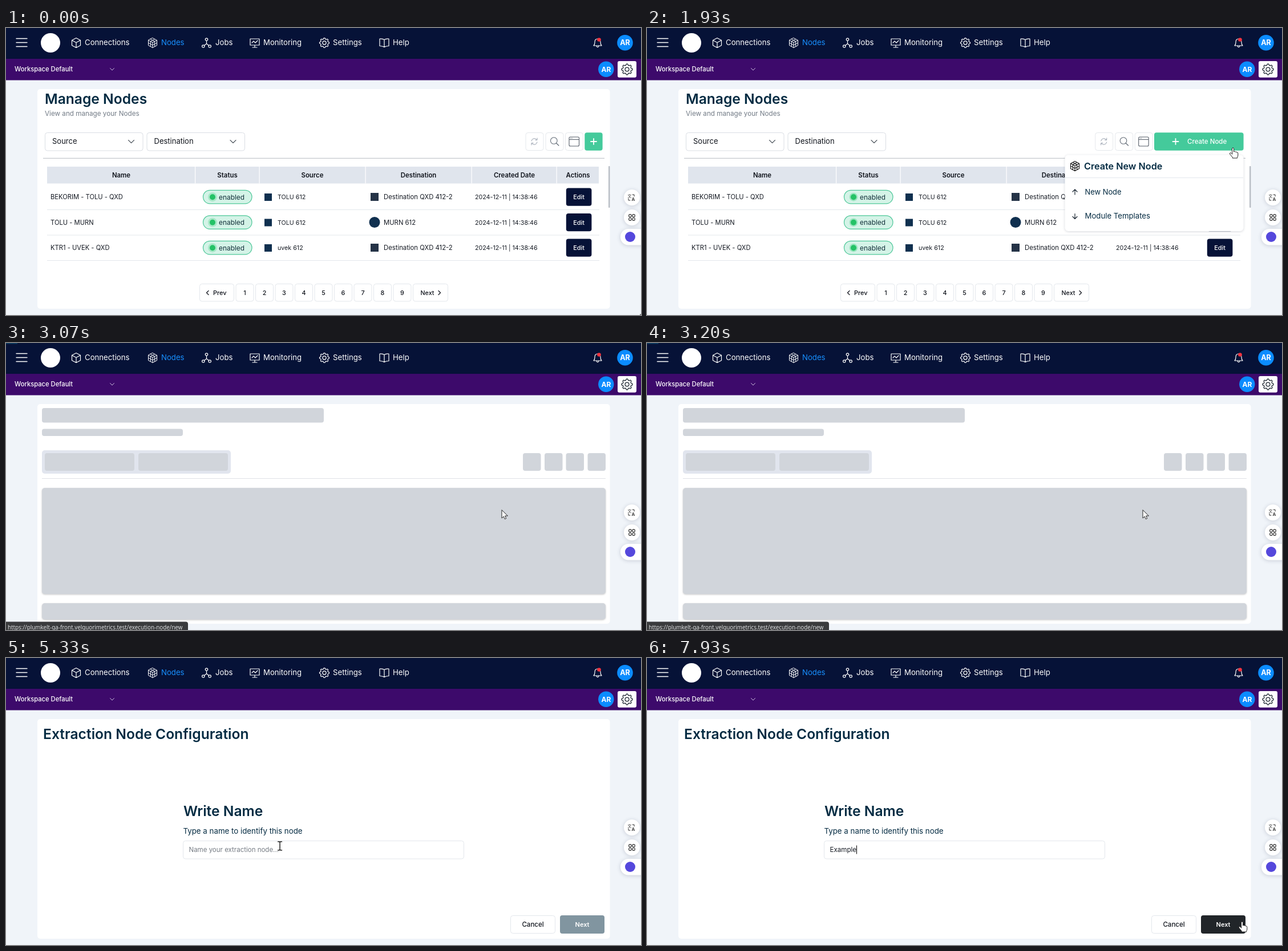
These frames come from a looping animation (1113 by 503 pixels, 8 s). An HTML page with a canvas:

```html
<!DOCTYPE html>
<html lang="en">
<head>
<meta charset="utf-8">
<title>Manage Nodes</title>
<style>
html, body { margin: 0; width: 100%; height: 100%; overflow: hidden; background: #f0f4f9; }
canvas { display: block; width: 1113px; height: 503px; }
</style>
</head>
<body>
<canvas id="stage" width="1113" height="503"></canvas>
<script>
const LOOP = 8000, STEP = 1000 / 15;
const ctx = document.getElementById('stage').getContext('2d');
const SANS = 'Inter, "Open Sans", sans-serif';
const NAVY = '#061237', INK = '#042b42', GRAY = '#d1d5db', LINE = '#e3e7ec';

const clamp = v => Math.max(0, Math.min(1, v));
const ease = v => v * v * (3 - 2 * v);
const span = (t, a, b) => ease(clamp((t - a) / (b - a)));

// y is the middle of the capital letters
function text(str, x, y, size, color, weight = 400, align = 'left', family = SANS) {
  ctx.font = `${weight} ${size}px ${family}`;
  ctx.fillStyle = color;
  ctx.textAlign = align;
  ctx.fillText(str, x, y + size * 0.364);
}

function box(x, y, w, h, r, fill, stroke, lw = 1) {
  ctx.beginPath();
  ctx.roundRect(x, y, w, h, r);
  paint(fill, stroke, lw);
}

function disc(x, y, r, fill, stroke, lw = 1) {
  ctx.beginPath();
  ctx.arc(x, y, r, 0, 7);
  paint(fill, stroke, lw);
}

function paint(fill, stroke, lw) {
  if (fill) { ctx.fillStyle = fill; ctx.fill(); }
  if (stroke) { ctx.strokeStyle = stroke; ctx.lineWidth = lw; ctx.stroke(); }
}

function path(d, x, y, stroke, lw = 1.2, fill) {
  const p = new Path2D(d);
  ctx.save();
  ctx.translate(x, y);
  ctx.lineCap = ctx.lineJoin = 'round';
  if (fill) { ctx.fillStyle = fill; ctx.fill(p); }
  if (stroke) { ctx.strokeStyle = stroke; ctx.lineWidth = lw; ctx.stroke(p); }
  ctx.restore();
}

function shadowed(color, blur, dy, draw) {
  ctx.save();
  ctx.shadowColor = color;
  ctx.shadowBlur = blur;
  ctx.shadowOffsetY = dy;
  draw();
  ctx.restore();
}

function gear(x, y, r, color, lw) {
  ctx.beginPath();
  for (let i = 0; i < 96; i++) {
    const a = i / 96 * Math.PI * 2;
    const k = r * (0.89 + 0.11 * Math.tanh(2.5 * Math.cos(8 * a)));
    ctx.lineTo(x + k * Math.cos(a), y + k * Math.sin(a));
  }
  ctx.closePath();
  paint(null, color, lw);
  disc(x, y, r * 0.36, null, color, lw);
}

const CUBE = 'M0-8.5L7.5-4.5V4.5L0 8.5L-7.5 4.5V-4.5ZM-7.5-4.5L0-.5L7.5-4.5M0-.5V8.5';
const GRID = CUBE + 'M-3.8-6.5L3.7-2.5V6.5M3.8-6.5L-3.7-2.5V6.5M-7.5 0L0 4L7.5 0';
const CHEVRON = 'M-5-2.5L0 2.5L5-2.5';

function header() {
  box(0, 0, 1113, 54, 0, NAVY);
  box(0, 54, 1113, 37.5, 0, '#3d0a6b');
  path('M18 18.5H37M18 25.5H37M18 32.5H37', 0, 0, '#fff', 1.3);
  disc(78, 26, 17, '#fff');

  path(CUBE, 123, 26, '#fff');
  path(GRID, 257, 26, '#fff', 1);
  path('M0-4V1.5L-4.5 5M0 1.5L4.5 5', 351.5, 26, '#fff');
  [[0, -6], [-5.7, 6], [5.7, 6]].forEach(([x, y]) => disc(351.5 + x, 26 + y, 2.2, NAVY, '#fff', 1.2));
  path('M-8-7H8V4H-8ZM0 4V8M-4 8H4M-5 0L-2-3L1 0L5-4', 436, 26, '#fff');
  gear(558, 26, 8.5, '#fff', 1.2);
  path('M0-5Q-3-7-8-6.5V6Q-3 6 0 8Q3 6 8 6V-6.5Q3-7 0-5V8', 663, 25.5, '#fff');

  [['Connections', 138], ['Nodes', 272], ['Jobs', 367], ['Monitoring', 451], ['Settings', 573], ['Help', 678]]
    .forEach(([s, x]) => text(s, x, 25.5, 13.2, s === 'Nodes' ? '#1890ff' : '#fff'));

  path('M-7 5Q-5 3-5-1Q-5-7 0-7Q5-7 5-1Q5 3 7 5ZM-2 5.5Q0 10 2 5.5', 1037, 26, '#fff');
  disc(1039.5, 20.5, 3.3, '#f5333f');
  disc(1085, 25.7, 13.8, '#0b8cff');
  text('AR', 1085, 25.5, 12.5, '#fff', 700, 'center');

  text('Workspace Default', 15, 72, 11.2, '#fff', 500);
  path('M-3.5-1.5L0 2L3.5-1.5', 186, 72, '#cdbfe0', 1);
  disc(1051.8, 72.3, 13.7, '#0b8cff');
  text('AR', 1052, 72.3, 12, '#fff', 700, 'center');
  box(1072, 58, 33, 28.7, 3, '#fff');
  gear(1088.5, 72.5, 9.5, '#1c2430', 1.3);
}

function sideTools() {
  shadowed('rgba(40,50,80,.2)', 7, 1, () => {
    disc(1097, 297, 14, '#fff');
    disc(1097, 332, 14, '#fff');
    box(1077, 352, 60, 28.5, 14, '#fff');
  });
  text('文', 1089.5, 294.5, 7, '#333', 500, 'left', '"Noto Sans CJK SC", sans-serif');
  text('A', 1096.5, 300, 8, '#333', 600);
  path('M1098 292H1101V295M1091 299V302H1094', 0, 0, '#333', 1);
  for (const x of [-3.1, 3.1]) for (const y of [-3.1, 3.1]) disc(1097 + x, 332 + y, 2.3, null, '#333', 1.1);
  disc(1094, 366, 9, '#5548dc');
}

const ROWS = [
  ['BEKORIM - TOLU - QXD', 'TOLU 612', 'Destination QXD 412-2'],
  ['TOLU - MURN', 'TOLU 612', 'MURN 612'],
  ['KTR1 - UVEK - QXD', 'uvek 612', 'Destination QXD 412-2']
];

// Status dot: ring grows to twice its size and fades out once a second
function ping(x, y, t) {
  const p = clamp(((t + 200) % 1000) / 750);
  let s = p;
  for (let i = 0; i < 12; i++) s = Math.sqrt(p / (0.6 + 0.4 * s));
  const k = ease(clamp(s));
  ctx.globalAlpha = 0.75 * (1 - k);
  disc(x, y, 5 * (1 + k), '#3fd17f');
  ctx.globalAlpha = 1;
  disc(x, y, 5, '#24c266');
}

function table(t) {
  box(72, 243, 967, 29.5, 0, '#e0e5ed');
  [331.5, 444, 630, 816, 965].forEach(x => box(x - 0.5, 243, 1.2, 29.5, 0, '#fff'));
  [['Name', 202], ['Status', 388], ['Source', 537], ['Destination', 723], ['Created Date', 891], ['Actions', 1002.5]]
    .forEach(([s, x]) => text(s, x, 258, 11.4, '#10141c', 600, 'center'));

  ROWS.forEach(([name, source, dest], i) => {
    const y = 296 + i * 44.5, mid = y + 0.2;
    text(name, 78, mid, 11.2, '#161b24');
    box(345.5, y - 11.7, 85.5, 23.5, 12, '#d4f3e7', '#4cc798', 1.2);
    ping(362, y + 0.2, t);
    text('enabled', 373, mid, 11.9, '#12303a');
    box(453, y - 6, 13, 13, 0, '#10304f');
    text(source, 476, mid, 10.7, '#161b24');
    if (i === 1) disc(646, y, 9.5, '#10304f');
    else box(639, y - 7, 14, 14, 0, '#253347');
    text(dest, 662, mid, 11.3, '#161b24');
    text('2024-12-11 | 14:38:46', 822, mid, 10.7, '#161b24');
    box(981.8, y - 15.5, 44.6, 31.3, 4, NAVY);
    text('Edit', 1004, mid, 10.9, '#fff', 500, 'center');
    box(72, y + 22, 968, 1, 0, LINE);
  });
  box(1056, 242, 2.5, 73, 1, '#b9bec6');
}

function pager() {
  box(339.5, 448.5, 60, 30.5, 4, '#fff', LINE);
  text('Prev', 363, 464, 11, '#10141c', 500);
  path('M2-3.5L-1.5 0L2 3.5', 353, 464, '#10141c');
  for (let i = 0; i < 9; i++) {
    const x = 418.5 + i * 34.5;
    box(x - 15.5, 448.5, 31, 30.5, 4, '#fff', LINE);
    text(i + 1, x, 464, 10.8, '#10141c', 500, 'center');
  }
  box(713.5, 448.5, 61, 30.5, 4, '#fff', LINE);
  text('Next', 726.5, 464, 10.7, '#10141c', 500);
  path('M-2-3.5L1.5 0L-2 3.5', 760, 464, '#10141c');
}

const grow = t => 125.3 * span(t, 1400, 1730);

function toolbar(t) {
  const w = grow(t), x = -w;
  [926.5, 961.5, 996].forEach(c => box(c - 15.5 + x, 183.5, 31, 31, 4, '#fff', '#e5e8ec'));
  path('M-5-1A5.2 5.2 0 0 1 4.5-3M5 1A5.2 5.2 0 0 1-4.5 3M5-6V-2.7H1.8M-5 6V2.7H-1.8', 926 + x, 199, '#98a1ae', 1);
  disc(960.3 + x, 197.5, 5.8, null, '#626b76', 1.1);
  path('M4 4L8.5 8.5', 960.3 + x, 197.5, '#626b76', 1.2);
  box(987 + x, 191, 17.5, 16, 2, null, '#565e69', 1.1);
  path('M987.5 195.5H1004M989.5 193.3H990M992 193.3H992.4', x, 0, '#565e69', 1);

  box(1014.3 - w, 183.3, 31.3 + w, 31.5, 4, '#44ca9b');
  path('M-5 0H5M0-5V5', 1030 - 103.5 * w / 125.3, 199, '#fff', 1.8);
  ctx.globalAlpha = span(t, 1530, 1730);
  text('Create Node', 947, 199, 11.5, '#fff', 500);
  ctx.globalAlpha = 1;
}

function menu(t) {
  if (t < 1790) return;
  ctx.globalAlpha = span(t, 1790, 1890);
  shadowed('rgba(30,40,60,.18)', 4, 1, () => box(732.5, 222.5, 313, 133.5, 6, '#fff'));
  path(GRID, 750, 242, '#111', 1.1);
  text('Create New Node', 766, 242, 16.2, INK, 600);
  box(733, 262, 312, 1, 0, LINE);
  path('M0 4.5V-4.5M-4-.5L0-4.5L4-.5', 750, 287.5, '#1b2733');
  text('New Node', 767.5, 287.5, 12.9, INK);
  path('M0-4.5V4.5M-4 .5L0 4.5L4 .5', 750, 330, '#1b2733');
  text('Module Templates', 767.5, 329.5, 13.2, INK);
  ctx.globalAlpha = 1;
}

function listPage(t) {
  text('Manage Nodes', 68, 124.5, 24.6, INK, 600);
  text('View and manage your Nodes', 68, 149.5, 11.7, '#727b86');
  [['Source', 68], ['Destination', 246.5]].forEach(([s, x]) => {
    box(x + 0.5, 183.5, 171.5, 31.5, 4, '#fff', '#dadee4');
    text(s, x + 13, 198.5, 13, '#10141c');
    path(CHEVRON, x + 151.5, 199, '#50575f', 1.1);
  });
  box(65, 227.7, 984, 1.2, 0, '#c5c9ce');
  toolbar(t);
  table(t);
  pager();
  menu(t);
}

function skeleton() {
  box(63, 114, 494, 25.5, 4, GRAY);
  box(63, 150.5, 247, 12.5, 4, GRAY);
  box(63, 188, 331, 41, 5, '#e1e5ee');
  box(68, 193, 157, 31, 4, GRAY);
  box(232, 193, 157, 31, 4, GRAY);
  [906, 944, 981.5, 1019.5].forEach(x => box(x, 193, 31.5, 31, 4, GRAY));
  box(63, 237, 988, 1, 0, '#dfe2e7');
  shadowed('rgba(0,0,0,.22)', 3, 1, () => {
    box(63, 254, 988, 186, 5, GRAY);
    box(63, 456, 988, 28.5, 5, GRAY);
  });
  box(0, 0, 20, 1.5, 0, '#0c3f63');
}

const FOCUS = 5400;
const KEYS = [5670, 6070, 6200, 6330, 6530, 6670, 6730];
const NEXT = [971, 451, 78, 32];
const inside = (p, x, y, w, h) => p.x >= x && p.x <= x + w && p.y >= y && p.y <= y + h;

function formPage(t, p) {
  const typed = 'Example'.slice(0, KEYS.filter(k => k <= t).length);
  text('Extraction Node Configuration', 65, 133.5, 24.6, INK, 600);
  text('Write Name', 311, 268.5, 24.6, INK, 600);
  text('Type a name to identify this node', 310.5, 303, 13.3, INK);
  box(310.5, 320.5, 492, 31.5, 4, '#fff', LINE);
  if (typed) text(typed, 320.5, 336, 11.6, '#161b24');
  else text('Name your extraction node...', 320.5, 336, 11.5, '#767c84');

  const last = [FOCUS, ...KEYS].filter(k => k <= t).pop();
  if (last && Math.floor((t - last) / 500) % 2 === 0) {
    const w = typed ? ctx.measureText(typed).width : 0;
    box(Math.round(320.5 + w), 328.5, 1, 15, 0, '#000');
  }

  box(884.5, 451.5, 78, 31, 4, '#fff', LINE);
  text('Cancel', 923.5, 467, 11.5, '#10141c', 500, 'center');
  const hover = typed && inside(p, ...NEXT);
  box(...NEXT, 4, hover ? '#212529' : typed ? '#042b42' : '#8195a0');
  text('Next', 1010, 467, 11, '#fff', 600, 'center');
}

function linkHint() {
  box(-4, 488.5, 323, 20, 4, '#3a3b3d');
  text('https://plumkelt-qa-front.velquorimetrics.test/execution-node/new', 3, 498, 9.9, '#e6e8ea', 400, 'left', '"Open Sans", sans-serif');
}

// time, x, y of the pointer
const MOVES = [
  [0, 1112, 502], [870, 1034, 300], [1270, 1018, 207], [1530, 1018, 207], [1800, 1027, 210], [2070, 1027, 210],
  [2800, 869, 293], [3800, 869, 293], [4200, 847, 292], [4600, 847, 292], [4930, 521, 305],
  [5070, 521, 305], [5470, 464, 339], [7130, 464, 339], [7600, 1103, 436], [7930, 1043, 462]
];

function pointer(t) {
  let i = MOVES.findIndex(m => m[0] > t);
  if (i < 0) i = MOVES.length;
  const a = MOVES[i - 1], b = MOVES[i] || a;
  const k = span(t, a[0], b[0] + (a === b));
  return { x: a[1] + (b[1] - a[1]) * k, y: a[2] + (b[2] - a[2]) * k };
}

const ARROW = 'M0 0V14L3.2 11L5.3 15.6L7.7 14.5L5.6 10H10Z';
const HAND = 'M-1.5 1.5A1.5 1.5 0 0 1 1.5 1.5V7L2.5 6.5Q4 6 4.5 7.3Q6.1 6.5 6.8 8Q8.8 7.5 8.8 9.6V13Q8.8 15 7.6 16.5V18H-.8V16.5L-5.3 11Q-6.3 9.4-4.9 8.8Q-3.7 8.5-2.9 9.5L-1.5 11Z';
const BEAM = 'M-3.5-7.5H-1.2L0-6.8L1.2-7.5H3.5M0-6.8V6.8M-3.5 7.5H-1.2L0 6.8L1.2 7.5H3.5';

function cursor(t, p, view) {
  if (view === 'form' && inside(p, 311, 321, 492, 31)) return path(BEAM, p.x, p.y, '#000', 1.3);
  const w = grow(t);
  const hand = view === 'list'
    ? inside(p, 1014 - w, 183, 32 + w, 32) || (t > 1890 && inside(p, 733, 270, 312, 80))
    : view === 'form' && t > KEYS[0] && inside(p, ...NEXT);
  path(hand ? HAND : ARROW, p.x, p.y, '#222', 1, '#fff');
}

function draw(t) {
  const view = t < 3000 ? 'list' : t < 3400 ? 'wait' : 'form';
  const p = pointer(t);
  box(0, 0, 1113, 503, 0, '#f0f4f9');
  box(55, 107, 1003.5, 385, 5, '#fff');
  header();
  if (view === 'list') listPage(t);
  else if (view === 'wait') skeleton();
  else formPage(t, p);
  sideTools();
  if (t >= 2730 && t < 3470) linkHint();
  cursor(t, p, view);
}

const snap = t => Math.round(Math.floor((t + 5) / STEP) * STEP / 10) * 10;

const start = performance.now();
function tick() {
  draw(snap((performance.now() - start) % LOOP) % LOOP);
  requestAnimationFrame(tick);
}
tick();
</script>
</body>
</html>
```
